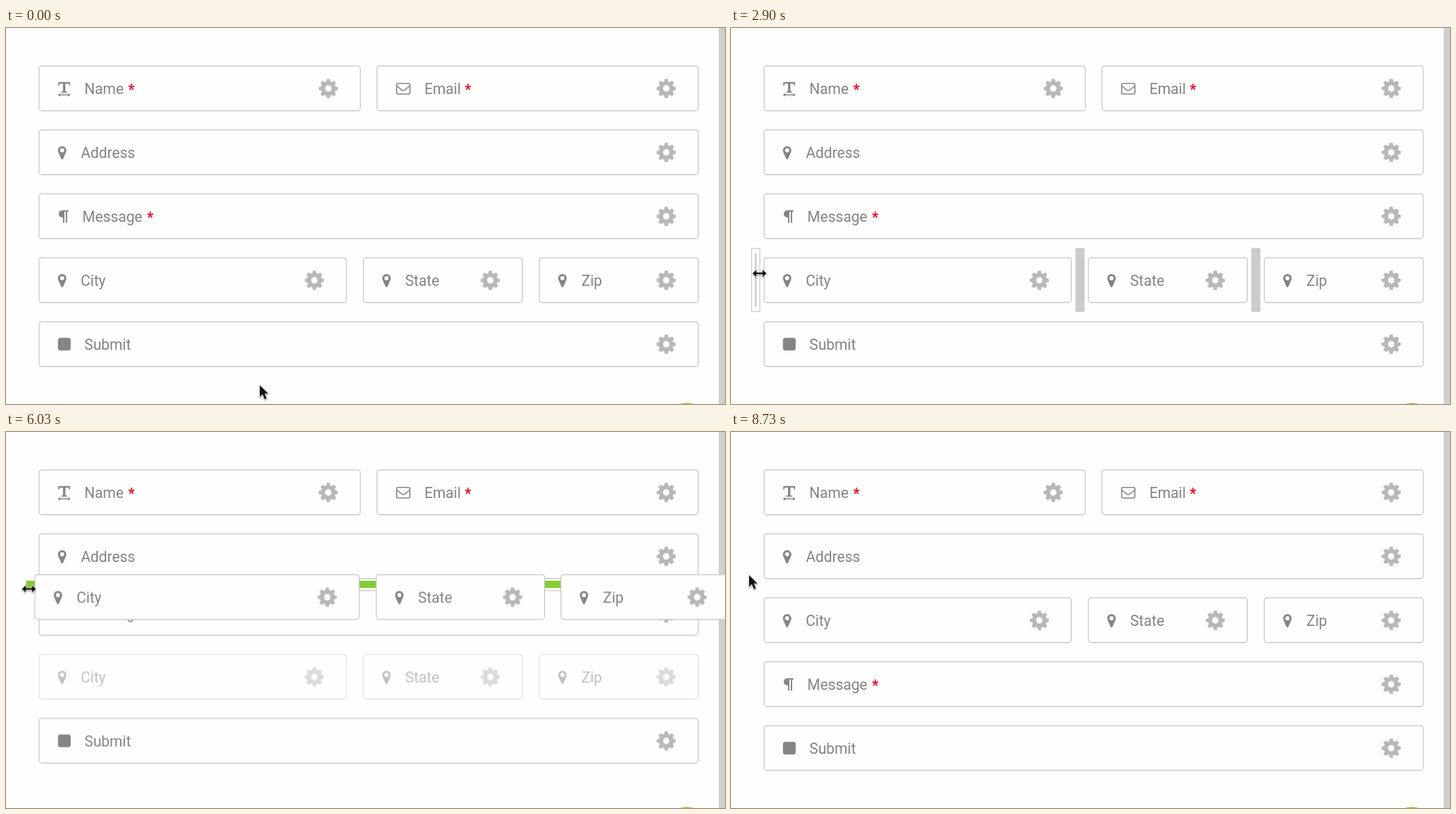
These frames come from a looping animation (1034x541 px, 8.83 s). An HTML page:

```html
<!DOCTYPE html>
<html lang="en">
<head>
<meta charset="utf-8">
<title>Form builder: dragging a row</title>
<style>
  html, body { margin: 0; width: 100%; height: 100%; overflow: hidden; background: #fefefd; }
  svg { display: block; width: 1034px; height: 541px; }
  text { font: 21.2px Roboto, Arial, sans-serif; fill: #838385; }
  .star { fill: #f5001d; font-weight: 500; }
  .card { fill: #fefefd; stroke: #c7c7c7; stroke-width: 1.3; }
  .icon { fill: #858588; }
  .line { fill: none; stroke: #858588; stroke-width: 1.6; }
  .gear { fill: #b7b7b9; fill-rule: evenodd; }
  .green { fill: #86cc33; }
  #cursor { filter: drop-shadow(0 1.5px 1.2px rgba(0, 0, 0, .4)); }
  .dark { fill: #111; stroke: #fff; stroke-width: 1.5; paint-order: stroke; stroke-linejoin: round; }
</style>
</head>
<body>
<svg viewBox="0 0 1034 541">
  <rect x="1025" width="9" height="541" fill="#cfcfcd"/>
  <circle class="green" cx="979" cy="577" r="37.5"/>
  <g id="top"></g>
  <g id="address"></g>
  <g id="message"></g>
  <g id="city"></g>
  <g id="submit"></g>
  <g id="handles">
    <rect x="29.5" y="317.300" width="12" height="90.500" fill="#fefefd" stroke="#c9c9c9" stroke-width="1.2"/>
    <path d="M35.500 324v77" stroke="#d3d3d3" stroke-width="3"/>
    <path d="M495.500 316.500h13v92h-13zM748.300 316.500h13v92h-13z" fill="#cbcbca"/>
  </g>
  <rect id="bar" class="green" x="29" width="985" height="10.500"/>
  <g id="clone"></g>
  <g id="cursor">
    <path id="arrow" class="dark" d="M0 .5V17.200l3.900-3.600 3.100 7.200 2.900-1.200-3-7H12.200z"/>
    <g id="hand" transform="translate(-6 -1)" stroke="#222" stroke-width="1.400" stroke-linejoin="round">
      <path fill="#fff" d="M6.300 13 4.200 4C3.600 1.300 6.800.7 7.500 3.200L9 9c.3-1.800 3-1.700 3.300.2.600-1.600 3-1.200 3.200.6.800-1.200 3-.8 3.200 1.200.4 3.500-.2 5-1.200 7.500V22H8.500v-2C6.500 18 4.500 15 2.200 12.800.5 11 2.500 9 4.300 10.600z"/>
      <path fill="none" stroke-width="1.100" d="M9.800 14.500v4M12.300 14.500v4M14.800 14.500v4"/>
    </g>
    <path id="resize" class="dark" d="M-10 0l5.500-5.300v4h9v-4L10 0 4.500 5.300v-4h-9v4z"/>
  </g>
</svg>
<script>
const LOOP = 8830;
const $ = id => document.getElementById(id);

// Gear outline: eight teeth around a ring, centred on 0,0
const gear = (() => {
  let pts = [];
  for (let i = 0; i < 8; i++) {
    const mid = i * Math.PI / 4;
    for (const [r, a] of [[10.7, -.26], [13.9, -.17], [13.9, .17], [10.7, .26]]) {
      pts.push((r * Math.sin(mid + a)).toFixed(2) + ' ' + (-r * Math.cos(mid + a)).toFixed(2));
    }
  }
  return `M${pts.join('L')}zM4.700 0a4.700 4.700 0 1 0-9.400 0a4.700 4.700 0 1 0 9.400 0z`;
})();

// Icons, placed relative to the card's top left corner
const icons = {
  width: `<path class="icon" d="M27.700 23.300h17v5h-1.400l-.8-2.900h-4.600v11.200l2.700.6v1.300h-8.800v-1.300l2.700-.6V25.400h-4.600l-.8 2.900h-1.400z
    M27.200 41.700l3.200-2.600v1.900h11.600v-1.900l3.200 2.600-3.200 2.600v-1.900H30.400v1.900z"/>`,
  mail: `<rect class="line" x="28.300" y="25.300" width="19" height="15.200" rx="2"/>
    <path class="line" d="M28.500 29l7 5.600q2.300 1.800 4.600 0l7-5.600"/>`,
  pin: `<path class="icon" fill-rule="evenodd" transform="translate(33.200 29.600)"
    d="M-6.100 0a6.100 6.100 0 0 1 12.200 0q0 1.500-.5 2.400L1.500 11.900a1.650 1.650 0 0 1-3 0L-5.600 2.400Q-6.100 1.500-6.100 0zM3 0a3 3 0 1 0-6 0a3 3 0 1 0 6 0z"/>`,
  para: `<path class="icon" transform="translate(27.500 23.700)"
    d="M15 0H6a5.200 5.200 0 0 0 0 10.400h1V18h2V2h2v16h2V2h2z"/>`,
  square: `<rect class="icon" x="27.200" y="23.200" width="18.300" height="18.300" rx="3.500"/>`
};

function card(x, w, icon, label, textX, starX) {
  return `<g transform="translate(${x} 0)">
    <rect class="card" width="${w}" height="64.500" rx="4"/>
    ${icons[icon]}
    <text x="${textX}" y="40.300">${label}</text>
    ${starX ? `<text class="star" x="${starX}" y="41.800">*</text>` : ''}
    <path class="gear" transform="translate(${w - 46} 32.500)" d="${gear}"/>
  </g>`;
}

const place = (x1, w1, x2, w2, x3, w3) =>
  card(x1, w1, 'pin', 'City', 60) +
  card(x2, w2, 'pin', 'State', 60) +
  card(x3, w3, 'pin', 'Zip', 60.5);

$('top').innerHTML = card(0, 462, 'width', 'Name', 65.2, 128.3) + card(486, 462, 'mail', 'Email', 68.200, 126.200);
$('address').innerHTML = card(0, 948, 'pin', 'Address', 60.300);
$('message').innerHTML = card(0, 948, 'para', 'Message', 62.300, 155.300);
$('city').innerHTML = place(0, 442, 466.5, 228.5, 719.5, 228.5);
$('submit').innerHTML = card(0, 948, 'square', 'Submit', 65.300);
$('clone').innerHTML = place(0, 466.5, 491, 242, 756.5, 242);

// steps: [ms, value, easing towards the next step]; without easing the value holds
function track(id, prop, steps) {
  const frames = steps.map(([ms, value, easing = 'step-end']) => ({ offset: ms / LOOP, [prop]: value, easing }));
  frames.push({ offset: 1, [prop]: steps[steps.length - 1][1] });
  $(id).animate(frames, { duration: LOOP, iterations: Infinity });
}
const move = (id, steps) =>
  track(id, 'transform', steps.map(([ms, x, y, ease]) => [ms, `translate(${x}px, ${y}px)`, ease]));
const show = (id, ...steps) => track(id, 'opacity', steps);

const GRAB = 4600, OVER_MESSAGE = 5190, OVER_ADDRESS = 6200, BACK = 7230, DROP = 8530;
const X = 47.5, rowY = i => 54.5 + 92 * i, up = i => rowY(i) - 10.5;

move('top', [[0, X, rowY(0)]]);
move('address', [[0, X, rowY(1)], [OVER_ADDRESS, X, up(1)], [BACK, X, rowY(1)]]);
move('message', [[0, X, rowY(2)], [OVER_MESSAGE, X, up(2)], [DROP, X, rowY(3)]]);
move('city', [[0, X, rowY(3)], [OVER_MESSAGE, X, up(3)], [DROP, X, rowY(2)]]);
move('submit', [[0, X, rowY(4)], [GRAB, X, up(4)], [DROP, X, rowY(4)]]);
move('bar', [[0, 0, 398], [OVER_MESSAGE, 0, 214], [OVER_ADDRESS, 0, 122], [BACK, 0, 214]]);
move('clone', [
  [0, X, 330.5], [4930, X, 330.5, 'ease-in'], [5300, X, 278, 'ease-out'], [5800, 44.5, 231.5],
  [5830, 44, 229, 'linear'], [6030, 41.5, 205.5, 'ease-out'], [6300, 41.5, 153],
  [7160, 41.5, 153, 'linear'], [7300, 41.5, 178.5]
]);
move('cursor', [
  [0, 365, 513.5], [530, 365, 513.5, 'ease-in-out'], [1030, 400, 363],
  [1500, 400, 363, 'cubic-bezier(.4,.2,.8,.9)'], [2260, 103, 363, 'ease-out'], [2360, 75, 363],
  [2400, 75, 363, 'ease-in-out'], [2900, 41, 353],
  [4530, 36.5, 357.5], [4930, 36.5, 357.5, 'ease-in'], [5300, 35.5, 305, 'ease-out'], [5800, 34, 257],
  [5830, 34, 254, 'linear'], [6030, 33, 226, 'ease-out'], [6300, 33, 184.500],
  [6530, 30, 184.500], [6560, 28, 184.500],
  [7160, 28, 184.500, 'linear'], [7300, 27, 210], [8730, 26, 205.500]
]);

show('city', [0, 1], [GRAB, .5], [DROP, 1]);
show('handles', [0, 0], [830, 1], [GRAB, 0]);
show('bar', [0, 0], [GRAB, 1], [DROP, 0]);
show('clone', [0, 0], [GRAB, 1], [DROP, 0]);
show('arrow', [0, 1], [670, 0], [8730, 1]);
show('hand', [0, 0], [670, 1], [2700, 0]);
show('resize', [0, 0], [2700, 1], [8730, 0]);
</script>
</body>
</html>
```
